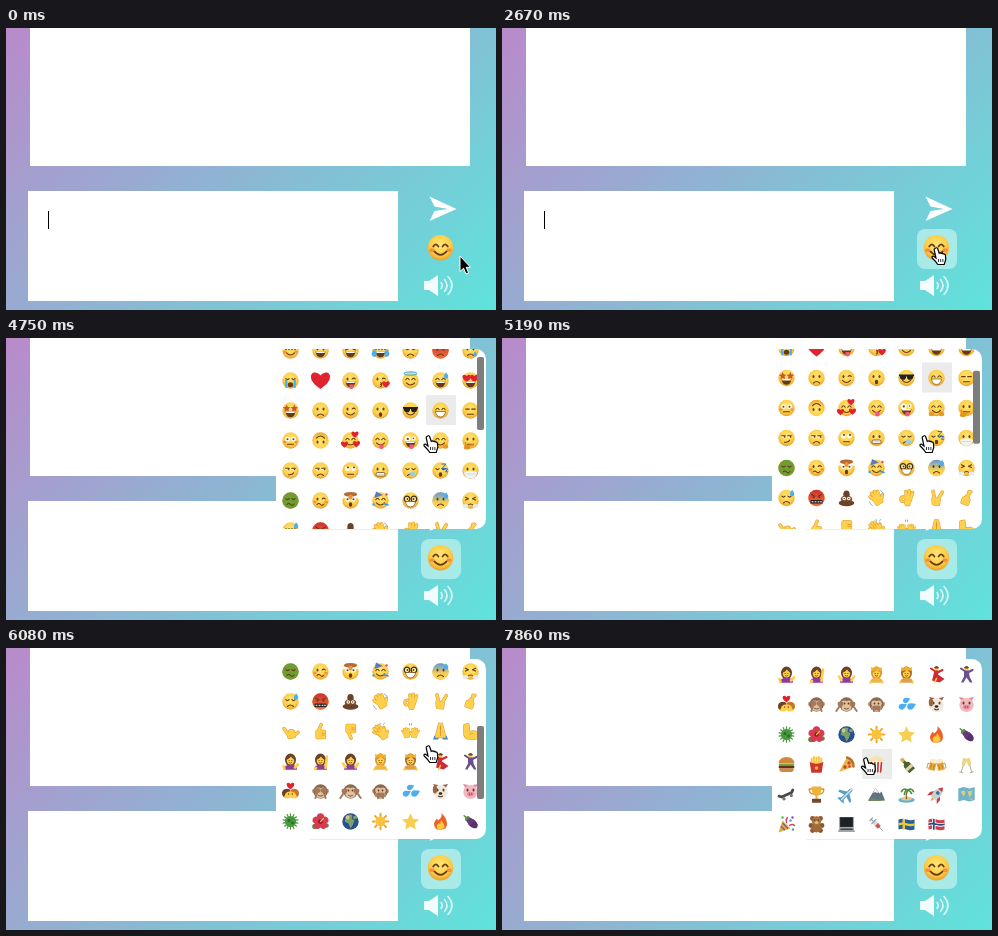
Recreate the animation shown at these times as an HTML page. Size 490 px wide and 282 px high, loop 8000 ms.

```html
<!DOCTYPE html>
<html lang="en">
<head>
<meta charset="utf-8">
<title>Emoji picker</title>
<style>
html, body { margin: 0; height: 100%; overflow: hidden; }
svg { display: block; width: 100vw; height: 100vh; }
</style>
</head>
<body>
<svg viewBox="0 0 490 282">
  <defs>
    <linearGradient id="bg" gradientUnits="userSpaceOnUse" x1="0" y1="0" x2="386" y2="386">
      <stop stop-color="#b98aca"/><stop offset="1" stop-color="#5fe3dc"/>
    </linearGradient>
    <radialGradient id="face" cx=".5" cy=".38" r=".64">
      <stop stop-color="#ffe678"/><stop offset=".65" stop-color="#fccd45"/><stop offset="1" stop-color="#ea9a2a"/>
    </radialGradient>
    <linearGradient id="red" x2="0" y2="1"><stop stop-color="#cf3030"/><stop offset="1" stop-color="#f0703c"/></linearGradient>
    <linearGradient id="cold" x2="0" y2="1"><stop stop-color="#5a9be0"/><stop offset=".65" stop-color="#fcd050"/></linearGradient>
    <clipPath id="clip"><rect x="270" y="11" width="210" height="180" rx="10"/></clipPath>
  </defs>
  <rect width="490" height="282" fill="url(#bg)"/>
  <path d="M24 0H464V138H24zM22 163H392V273H22z" fill="#fff"/>
  <path id="caret" d="M42.5 183V201" stroke="#000"/>
  <path d="M423.5 168.5L450.5 181L423.5 193L428.5 183L442 181L428.5 178.500z" fill="#fff"/>
  <rect id="glow" x="415" y="201" width="40" height="40" rx="8" fill="#ecfff8" opacity=".47"/>
  <g id="button" transform="translate(434.5 219.8) scale(1.55)"></g>
  <path d="M418 253h5l9-6v21l-9-6h-5z" fill="#fff" opacity=".92"/>
  <path d="M435 254.5q2.4 3 0 6M438.5 251.5q5 6 0 12M442 248.500q8 9 0 18" fill="none" stroke="#fff" stroke-width="1.6" stroke-linecap="round" opacity=".75"/>
  <g id="picker">
    <rect x="270" y="11" width="210" height="180" rx="10" fill="#fff"/>
    <path d="M270 138V163H282V138z" fill="#fff"/>
    <path d="M304 191.5H392" stroke="#ededed"/>
    <g clip-path="url(#clip)">
      <g id="list"><rect id="hover" width="30" height="30" fill="#ebebeb"/><g id="grid"></g></g>
      <rect id="thumb" x="471" width="7" height="73" rx="2" fill="#7d7d7d"/>
    </g>
  </g>
  <path id="arrow" d="M0 0V15.5L3.6 12.2L6 18L8.6 17L6.2 11.3H10.5z" stroke="#fff"/>
  <g id="hand">
    <path d="M-.8 .2Q1-1 1.8 1L3.2 5.2Q4.4 4.3 5.2 5.4Q6.7 4.8 7.2 6Q9 5.7 9.400 7.2L9.8 11.5L8.2 16.5H1.8Q.2 13.7-3.8 10Q-4.7 8.2-2.6 8L0 10L-1.8 2Q-2 .8-.8 .2z" fill="#fff" stroke="#000" stroke-width="1.2"/>
    <path d="M2.5 11v3M4.7 11v3M6.9 11v3" stroke="#000" stroke-width=".8"/>
  </g>
</svg>
<script>
const $ = id => document.getElementById(id);
const INK = '#643b12', SKIN = '#ffcd48', WHITE = '#fff', BLUE = '#4aaef0', BROWN = '#6b4226', PURPLE = '#8f3aa0';

// Drawing helpers: every emoji lives in a box of about -8..8.
const P = (d, fill) => `<path d="${d}" fill="${fill}"/>`;
const L = (d, color = INK, w = 1.1) =>
  `<path d="${d}" fill="none" stroke="${color}" stroke-width="${w}" stroke-linecap="round" stroke-linejoin="round"/>`;
const E = (x, y, rx, ry, fill) => `<ellipse cx="${x}" cy="${y}" rx="${rx}" ry="${ry}" fill="${fill}"/>`;
const C = (x, y, r, fill) => E(x, y, r, r, fill);
const G = (transform, ...body) => `<g transform="${transform}">${body.join('')}</g>`;
const pair = draw => draw(-3) + draw(3);
const heart = (x, y, s, fill = '#e0242f') =>
  G(`translate(${x} ${y}) scale(${s})`, P('M0 7.5C-15-2-7-12 0-4.5C7-12 15-2 0 7.5z', fill));
const star = (x, y, r, fill) => {
  const pts = [...Array(10)].map((_, i) => {
    const a = (i / 5 - .5) * Math.PI, q = i % 2 ? r * .48 : r;
    return `${(x + q * Math.cos(a)).toFixed(2)} ${(y + q * Math.sin(a)).toFixed(2)}`;
  });
  return P(`M${pts.join('L')}z`, fill);
};
const spokes = (n, a, b, color, w) => [...Array(n)].map((_, i) =>
  G(`rotate(${i * 360 / n})`, L(`M0 ${a}V${b}`, color, w))).join('');
const drop = (x, y, s = 1) => G(`translate(${x} ${y}) scale(${s})`, P('M0-3Q4 2 0 3Q-4 2 0-3z', BLUE));
const ball = fill => C(0, 0, 8.2, fill);

const parts = {
  // skins
  red: ball('url(#red)'), green: ball('#6f9c35'), cold: ball('url(#cold)'),
  // eyes
  dot: pair(x => E(x, -1.6, 1, 1.5, INK)),
  arc: pair(x => L(`M${x - 1.7}-.8q1.7-2.8 3.4 0`)),
  down: pair(x => L(`M${x - 1.6}-1.8q1.6 1.8 3.2 0`)),
  line: pair(x => L(`M${x - 1.8}-1.4h3.6`)),
  squint: L('M-5-3.2l3 1.5-3 1.3M5-3.2l-3 1.5 3 1.3'),
  wink: E(-3, -1.6, 1, 1.5, INK) + L('M1.6-1.5q1.6-1.8 3.2 0'),
  wide: pair(x => C(x, -1.3, 2.4, WHITE) + C(x, -1.3, 1, INK)),
  roll: pair(x => C(x, -1.8, 2.3, WHITE) + C(x + .5, -3, 1, INK)),
  side: pair(x => E(x, -1.3, 2, 1.3, WHITE) + C(x + 1, -1.2, .9, INK) + L(`M${x - 1.8}-2.3h3.6`)),
  zany: C(-3, -1.6, 2.9, WHITE) + C(-2.7, -1.6, 1.1, INK) + C(3.3, -2, 1.9, WHITE) + C(3, -2, .8, INK),
  angry: L('M-5-3.4l3.4 1.6M5-3.4l-3.4 1.6') + pair(x => C(x, -.8, 1, INK)),
  hearts: heart(-3.8, -2.2, .5) + heart(3.8, -2.2, .5),
  stars: star(-3.8, -2, 4, '#c9562c') + star(3.8, -2, 4, '#c9562c'),
  shades: P('M-7.6-3.4h15.2v1.2l-.8.6q-.4 3.4-3.4 3.4t-3-3.4h-.8q0 3.4-3 3.4t-3.4-3.4l-.8-.6z', '#222'),
  specs: pair(x => `<circle cx="${x * 1.15}" cy="-1.5" r="2.8" fill="#fff" fill-opacity=".35" stroke="#3a2c1c" stroke-width="1.2"/>` + C(x, -1.5, .9, INK)),
  // mouths
  smile: L('M-4 2.3q4 4.4 8 0'),
  grin: P('M-5 1h10q-.8 5.8-5 5.8t-5-5.8z', INK) + P('M-4.500 1.100h9l-.5 1.500h-8z', WHITE),
  beam: P('M-5 1h10q-.8 5.4-5 5.4t-5-5.400z', WHITE) + L('M-5 1h10q-.8 5.4-5 5.4t-5-5.400z', INK, .6),
  sad: L('M-3 5q3-3 6 0'),
  o: E(0, 4, 1.7, 2.2, INK),
  wail: E(0, 4.2, 2.8, 2.5, INK),
  flat: L('M-3 3.8h6'),
  smirk: L('M-2 4.2q4 .4 5.2-2'),
  wave: L('M-3.5 4q1.8-2 3.5 0t3.5-.5'),
  kiss: L('M0 2.2q2.5.8 0 1.8q2.5 1 0 2'),
  teeth: '<rect x="-4.5" y="2" width="9" height="3.6" rx="1.5" fill="#fff" stroke="#643b12" stroke-width=".7"/>' + L('M-4 3.8h8', '#999', .5),
  tongue: P('M-1 4h4q.6 4.5-2 4.5t-2-4.5z', '#ee5a7c'),
  // extras
  blush: pair(x => `<ellipse cx="${x * 1.85}" cy="1.5" rx="1.7" ry="1.2" fill="#f0683c" opacity=".6"/>`),
  tear: drop(4.6, 3.5, .9),
  joy: drop(-6.4, 2.5, 1.3) + drop(6.4, 2.5, 1.3),
  stream: L('M-4.3 0V6.5M4.3 0V6.500', BLUE, 2.2),
  sweat: drop(5.6, -5, 1.1),
  halo: '<ellipse cy="-7" rx="6" ry="1.7" fill="none" stroke="#4cb5ea" stroke-width="1.3"/>',
  love: heart(-6, 4, .42) + heart(6, 3.5, .42) + heart(4.5, -6, .42),
  blow: heart(5.5, 4, .45),
  hugs: E(-5, 6, 2.8, 2.2, '#e59a22') + E(5, 6, 2.8, 2.2, '#e59a22'),
  think: E(-3.5, 7, 3.2, 2, '#e09422') + L('M-4.5 6l-.5-3.500M-3 5.500l5-1', '#e09422', 1.900),
  bubble: C(2, 3.5, 2.5, '#8fd0f4'),
  zzz: L('M1.5-6.5h4l-4 4.5h4M5-1.5h2.2l-2.2 2.8h2.2', '#3d6fc0', 1),
  mask: P('M-6.5 1.5Q0-.5 6.5 1.5Q6 8 0 8T-6.5 1.500z', '#eef3f6') + L('M-8 0l2 1.5M8 0l-2 1.5M-4.5 3.5h9', '#c6d2d8', .7),
  steam: E(-5, 5.5, 3, 1.9, '#e6eaec') + E(5, 5.5, 3, 1.9, '#e6eaec'),
  censor: '<rect x="-6" y="2" width="12" height="3.6" rx=".6" fill="#222"/>' + L('M-4.5 3.8h1M-1.5 3.8h1M1.5 3.8h1M4 3.8h1', WHITE, 1),
  blast: P('M-8.2-2.5h16.4l-2-2.5h-12.4z', WHITE) + E(0, -6.2, 6.5, 2.4, '#b56a3a') + E(0, -3.6, 2.2, 2.5, '#e8963d'),
  party: P('M-6-2.5L-4.5-9L2.5-5.500z', '#5a78c8') + L('M3 3l4.5 1.5', '#3a9ad9', 1.5) + C(6, -6, 1.200, '#e34a5f') + C(-7, 4, 1.200, '#36a7d8')
};
const face = spec => ball('url(#face)') + spec.split(' ').map(w => parts[w]).join('');

// A hand is one outline drawn twice: dark edge, then skin.
const limb = (d, rot = 0) => G(`rotate(${rot}) scale(1.1)`, ...[['#dd9626', 3.2], ['#ffd04c', 2.3]].map(([color, w]) =>
  `<path d="${d}" fill="${color}" stroke="${color}" stroke-width="${w}" stroke-linecap="round" stroke-linejoin="round"/>`));
const palm = 'M-2.5 1h5v4h-5z';
const spread = palm + 'M-2.5 1l-2-4.800M-.8 1l-.8-7M1 1l.4-7M2.500 1l1.500-5.500M2.500 4l3.500-3.500';
const person = (hair, shirt, arms, extra = '') =>
  E(0, -1.5, 5.5, 6.5, hair) + P('M-6.5 8.2q0-5 6.5-5t6.5 5z', shirt) + L(arms, SKIN, 2.6) +
  E(0, -1.2, 3.7, 4.2, SKIN) + P('M-4.2-1.500Q-4-7.500 0-7T4.200-1.500Q2-3 .5-5Q-1-3-4.200-1.500z', hair) +
  C(-1.4, -1, .6, INK) + C(1.4, -1, .6, INK) + L('M-1.200 1.200q1.200 1 2.400 0', INK, .7) + extra;
const crown = P('M-5-3.5l-.6-4 2.800 1.200 2.800-2.500 2.800 2.500 2.800-1.200-.6 4q-5-1.500-10 0z', '#f0ae2c');
const dancer = (color, dress) => L('M-1-3L-5.5-6M1-2L6-4.5', color, 2.1) + C(0, -5.8, 2.3, SKIN) +
  P('M-2.5-7q2.5-3 5 0l-1 1h-3z', BROWN) + P(dress, color);
const monkey = (...paws) => C(-6.3, -.5, 2.3, '#c99a74') + C(6.3, -.5, 2.3, '#c99a74') + C(0, 0, 7.2, '#8d6850') +
  E(-2.2, -1, 3, 3, '#dfc0a0') + E(2.2, -1, 3, 3, '#dfc0a0') + E(0, 3, 5, 3.7, '#dfc0a0') +
  C(-2, -1, .9, INK) + C(2, -1, .9, INK) + L('M-2 4q2 1.5 4 0', INK, .8) +
  paws.map(([x, y]) => E(x, y, 2.9, 2.4, '#a3795a') + L(`M${x} ${y + 1}L${x * 1.7} 6.500`, '#a3795a', 2)).join('');
const snout = (skin, ears) => P('M-5-3l-2.5-4.5 5.5 1zM5-3l2.5-4.5-5.5 1z', ears) + E(0, .5, 7.2, 7, skin) + parts.dot;
const flag = (ground, cross) => P('M-8-5q4-1.5 8 0t8 0v10q-4 1.5-8 0t-8 0z', ground) + cross.map(([color, w]) =>
  `<path d="M-8-.2q4-1.3 8 0t8 0M-2.7-5.6v10.8" fill="none" stroke="${color}" stroke-width="${w}"/>`).join('');
const mug = L('M2 0h3v4.500h-3', '#d9a04a', 1) + P('M-3.3-3h6.6v9h-6.6z', '#e9a63a') + L('M-1.5 0v4M1.5 0v4', '#c07c22', .9) + E(0, -3.5, 3.9, 2.2, '#f7ead0');
const flute = P('M-2.2-8h4.4l-.6 7q-1.6 2-3.2 0z', '#eed48a') + L('M0-.5v6.500M-1.7 6.5h3.4', '#b5b09c', 1);
const lover = hair => C(0, 0, 4.6, SKIN) + P('M-4.800 1Q-6-5 0-5.200Q3.500-5 3.500-2.500Q-1-3-2 1L-3 3z', hair) + C(1.700, 0, .7, INK);

const icons = {
  heart: heart(0, 0, 1.12),
  flip: G('rotate(180)', face('dot smile')),
  poop: E(0, 5, 7.8, 3.2, BROWN) + E(0, 1, 5.8, 3.5, '#7a4e33') + E(0, -3.8, 3.2, 3.8, BROWN) + G('translate(0 1.500) scale(.75)', parts.wide, parts.smile),
  hi: limb(spread, -32) + L('M4-7.500q2.500 1 3 3.500M-7 4q.5 2.500 3 3.500', '#7fa4bd', .9),
  ok: L('M-3.5 3.500a2.400 2.400 0 1 1 2.500-3', '#dd9626', 3) + limb('M-1 3h3.500l-.5 3h-2zM.5 3L-.5-6M2 3L2.500-6.500M3 3L5.500-5') + L('M-3.5 3.500a2.400 2.400 0 1 1 2.500-3', SKIN, 2),
  peace: limb('M-3 1h5.500v4.500h-4.500zM-1.500 1l-2.500-6.500M1.500 1l3-7', 8),
  luck: limb(palm + 'M-1.5 1l3.5-7.500M1.5 1l-1-7', 18),
  call: limb(palm + 'M-2.5 3l-2.500-7M2.5 4l4-1.500M-.5 1v-1.500M1.500 1v-1.300', -14),
  up: limb('M-3 0h6.5v5.5h-6.5zM-2 0l2.5-6') + L('M1.5 1.7h2.5M1.5 3.5h2.5', '#d98f1c', .7),
  clap: G('translate(-1 0) scale(.9)', limb(spread, -48)) + G('translate(2 2) scale(.85)', limb(spread, -30)) + L('M0-7.500l-.5-1M3-7l1-1.500', BLUE, .8),
  praise: G('translate(-4.3 1.5) scale(.68)', limb(spread, -12)) + G('translate(4.3 1.5) scale(-.68 .68)', limb(spread, -12)) + L('M-1-6.5v-1.5M1-6.5v-1.5', BLUE, .9),
  pray: P('M-7.5 8l1.500-4 4 2v2zM7.5 8l-1.500-4-4 2v2z', '#3f87c9') + limb('M-.8-6.5L-3.500 4.500M.8-6.5L3.500 4.500M-1.500-1v5.500h3v-5.500z') + L('M0-6v10', '#d08a20', .7),
  flex: limb('M-2.500-6L-5-5.500L-5 1Q-5.500 6 0 6Q6 7 6 3.500Q5.500 0 2 .5Q0 .5-2 2.500L-2-3z') + L('M-1 3q1.500-2 3.500-1.500', '#d08a20', .7),
  tip: person(BROWN, PURPLE, 'M-6 7.500l-1-3M4.500 6l3-3'),
  raise: person(BROWN, PURPLE, 'M5 6.500L6.500-5M-5.500 7.500l1-1'),
  shrug: person(BROWN, PURPLE, 'M-5 6l-2.5-4M5 6l2.5-4'),
  prince: person('#d9982e', '#f0b544', 'M-6 8h0M6 8h0', crown),
  queen: person('#a86a2c', '#e0a045', 'M-6 8h0M6 8h0', crown),
  dance: dancer('#cf2a35', 'M-2-4h4l-.5 4 6.5 4.500-5 3.500-7.500-2z') + L('M0 4l-2 4', SKIN, 1.5),
  disco: dancer('#6b5090', 'M-2.5-4h5l.5 6 3 6h-2.5l-3.5-5-3 5h-2.5l3-6z'),
  couple: G('translate(-3.500 2.500)', lover(BROWN)) + G('translate(3.500 2.500) scale(-1 1)', lover('#c8742c')) + heart(0, -5.500, .45),
  see: monkey([-3, -1], [3, -1]), hear: monkey([-6, -.5], [6, -.5]), speak: monkey([-1.5, 3.500], [1.5, 3.500]),
  splash: G('rotate(65)', drop(0, 4, 1.5), drop(-4, -2, 1.300), drop(3.5, -4, 1.6)),
  dog: snout('#efe8de', '#9d6640') + E(-5.5, -2, 2.200, 4, '#9d6640') + E(0, 2, 1.8, 1.3, '#222') + L('M-2 4.5q2 1.5 4 0'),
  pig: snout('#f3b7c0', '#e0909f') + E(0, 2.5, 3.4, 2.3, '#e2899b') + C(-1.1, 2.5, .7, '#93475a') + C(1.1, 2.5, .7, '#93475a'),
  germ: spokes(14, -5, -7.6, '#4c9440', 1.2) + C(0, 0, 5.6, '#459a3c') + C(-1.5, -1, 1.5, '#2b6b27') + C(2, 1.5, 1.4, '#2b6b27'),
  flower: C(-5.5, 5, 2.800, '#4f8f3c') + C(6, 4, 2.300, '#4f8f3c') + [0, 72, 144, 216, 288].map(a => G(`rotate(${a})`, E(0, -4.5, 3.6, 3.7, '#d83a50'))).join('') + C(0, 0, 2.2, '#8f1730') + L('M0 0l3-3', '#f7c83c', 1.2),
  globe: C(0, 0, 8.2, '#264f94') + P('M-4-6q4-2 6 0l-1 3 3 2-2 5-2 3-2-5-4-2z', '#7da065') + E(4.500, -4, 2, 1.700, '#7da065') + C(-3, -4, 2, '#d6c48c'),
  sun: spokes(8, -5.5, -7.7, '#f2a52c', 2) + C(0, 0, 5, '#f9c43c'),
  star: star(0, .7, 9, '#f7cd52'),
  fire: P('M1-8.5Q6.500-3 6.500 2.500T0 8.3T-6.5 2Q-5.500-1-3.5-3L-2.5-1Q2-4 1-8.500z', '#ee5f2a') + P('M.5-1.500Q4 3 4 5T0 8T-3.8 4Q-2.500 2-1.5 1L-.5 3z', '#fccb3a'),
  plant: G('rotate(-48)', E(0, 3, 3.8, 5.800, '#57306c'), P('M-2-5.500h4l1.800 8h-7.600z', '#66387c'), P('M-3-4.500q3-4 6 0l-1.500 1.500-1.500-1-1.500 1z', '#5c8f45'), L('M0-6v-2.500', '#5c8f45', 1.5)),
  burger: P('M-7.8-1Q-7.5-7.5 0-7.5T7.8-1z', '#d0893c') + L('M-7 .2h14', '#7aa643', 1.7) + L('M-6.5 2.5h13', '#643319', 2.8) + P('M-7.3 4h14.6q0 3.5-3 3.5h-8.6q-3 0-3-3.500z', '#d0893c'),
  fries: L('M-4.8-1v-5M-2.4-1v-6.5M0-1v-6M2.400-1v-6.500M4.8-1v-5', '#f5c54c', 2) + P('M-6.8-2.5q6.8 3.5 13.6 0l-1.6 10.7h-10.4z', '#d0342f') + C(0, 3.5, 1.8, '#f2b932'),
  pizza: P('M-7.5 7.500L.5-7.5Q7-5 7.500 2z', '#f0b748') + L('M.5-7Q7-5 7 2', '#b5702f', 2.4) + C(2.5, -1.500, 1.7, '#c4452c') + C(-1.500, 2.5, 1.7, '#c4452c') + C(3, 2, 1.200, '#c4452c'),
  popcorn: [-4.5, -1.5, 1.5, 4.5].map(x => C(x, -4.2 - (x * x < 4) * 1.8, 2.6, '#f5e3ad')).join('') + P('M-6.5-3h13l-1.300 11.2h-10.4z', WHITE) + L('M-5-2l.9 9.3M-1.6-2l.3 9.3M1.6-2l-.3 9.3M5-2l-.9 9.300', '#c9352f', 1.7),
  bottle: G('rotate(-42)', P('M-1.5-7h3v5q2.300 1 2.300 3v7.500h-7.600v-7.500q0-2 2.300-3z', '#4b6330'), P('M-1.7-8h3.400v4h-3.4z', '#d3ae58'), P('M-3.8 2.500h7.6v3.200h-7.6z', '#e6d6a4')),
  beers: G('translate(-3.600 0) rotate(14) scale(-1 1)', mug) + G('translate(3.600 0) rotate(-14)', mug),
  toast: G('translate(-3.500 1.5) rotate(16)', flute) + G('translate(3.500 1.5) rotate(-16)', flute),
  board: G('rotate(-24)', L('M-7.5-1.500l2 1.800h11l2-1.800', '#47474c', 2.800), C(-4, 3, 1.6, '#7b6f64'), C(4, 3, 1.6, '#7b6f64')),
  trophy: L('M-4-5.5h-3.300q0 5 4.300 5M4-5.5h3.300q0 5-4.300 5', '#d3952a', 1.4) + P('M-5-8h10q0 8.5-4 9.5v3h-2v-3q-4-1-4-9.500z', '#eeb13a') + P('M-4.5 4.3h9v4h-9z', '#74492a'),
  plane: G('rotate(45)', P('M-1.7-6q1.7-4.500 3.4 0v3.500l6.5 4v2.2l-6.5-2v4l2.200 2v1h-7.800v-1l2.200-2v-4l-6.500 2v-2.2l6.5-4z', '#5b9dc4'), L('M0-7v14', '#d6e6ee', 1.500)),
  peak: P('M-8.5 6L-1-6.5L3-1L5-3L8.5 6z', '#5f7482') + P('M-1-6.5l3 4.5-2 .5-1-1-2.5 1z', '#f2f6f8') + P('M-8.5 6.500l4-3 5 1.500 8 1.500z', '#6e8c52'),
  island: E(0, 5.5, 8.2, 2.7, '#62b5d2') + E(0, 4, 5.5, 2, '#e6c987') + L('M0 4Q-1 0 1-4', '#8b5a2c', 1.4) + L('M1-4q-4-3-6 1M1-4q4-3 6 1M1-4q-3 0-3 4M1-4q3 0 4 3', '#4d933f', 1.7),
  rocket: G('rotate(42)', P('M-3 3l-3.500 4v-5l3.500-4zM3 3l3.500 4v-5l-3.500-4z', '#cc3d38'), P('M0-9.500Q6.500-3 2.7 5h-5.4Q-6.5-3 0-9.500z', '#c5d0d8'), P('M0-9.5l2.800 4h-5.600z', '#cc3d38'), C(0, -2, 1.8, '#3f6f98'), P('M-1.5 5h3l-1.5 4z', '#f5a32a')),
  map: P('M-8.2-6l5.200-1.5 6 1.5 5.200-1.5v13l-5.2 1.5-6-1.5-5.200 1.500z', '#6fb4c8') + P('M-6-3l4-1 1 3-2 3zM1-3l5-1-1 4-2 3zM3 4h3v1h-3z', '#d3cd8c'),
  popper: P('M-8 8l4-12 8 8z', '#dfab3c') + L('M-5.300 2l3.300 3.300M-3.500-1l4.500 4.500', '#7a5aa8', 1.3) + L('M0-2q-1-3 1-5M3 1q3-2 5 0', '#d0405c', 1.300) + [[4, -4], [-4, -7], [6, -7], [6.500, 5]].map(([x, y], i) => C(x, y, 1.2, ['#3fa0da', '#59b14b', '#8a4cc0'][i % 3])).join(''),
  bear: [[-4, -6], [4, -6], [-5.500, 1], [5.500, 1], [-4, 6], [4, 6]].map(([x, y]) => C(x, y, 2.400, '#8a572f')).join('') + E(0, 3, 4.800, 5, '#a06a3a') + C(0, -3.500, 4.700, '#a8723f') + E(0, -2, 2, 1.500, '#dfb884') + C(-1.800, -4.500, .7, INK) + C(1.800, -4.500, .7, INK),
  laptop: P('M-7-7.5h14v10.5h-14z', '#4a4d50') + P('M-6.200-6.700h12.4v9h-12.4z', '#1d2024') + P('M-7 3h14l1.500 4.500h-17z', '#a0a3a6') + L('M-5.500 4.7h11', '#444', 1.600),
  needle: G('rotate(-45)', P('M-2-4h4v8h-4z', '#d0dae0'), P('M-2 0h4v4h-4z', '#cc5a50'), L('M0 4v5', '#8d989e', .8), L('M0-4v-3M-2-7.5h4M-3-4h6', '#8a949c', 1)),
  sweden: flag('#2a5f95', [['#f0c93c', 2.4]]),
  norway: flag('#cc4048', [[WHITE, 3.4], ['#2c4680', 1.7]])
};
icons.down = G('rotate(180) scale(-1 1)', icons.up);

const rows = [
  'arc smile blush,dot grin,squint grin,arc grin joy,down sad,red angry sad,dot sad tear',
  'down wail stream,heart,wink grin tongue,wink kiss blow,arc smile halo,arc grin sweat,hearts grin',
  'stars grin,dot sad,wink smile,dot o,shades smile,arc beam,line flat',
  'wide flat blush,flip,arc smile love,arc smile tongue,zany grin tongue,arc smile hugs,dot flat think',
  'side smirk,side sad,roll flat,dot teeth,down sad bubble,down o zzz,dot mask',
  'green down wave,wink wave blush,wide o blast,arc smile party,specs beam,cold dot sad sweat,squint sad steam',
  'down sad sweat,red angry censor,poop,hi,ok,peace,luck',
  'call,up,down,clap,praise,pray,flex',
  'tip,raise,shrug,prince,queen,dance,disco',
  'couple,see,hear,speak,splash,dog,pig',
  'germ,flower,globe,sun,star,fire,plant',
  'burger,fries,pizza,popcorn,bottle,beers,toast',
  'board,trophy,plane,peak,island,rocket,map',
  'popper,bear,laptop,needle,sweden,norway'
];
const CELL = 30, LEFT = 270, TOP = 11, BOTTOM = 191;
$('grid').innerHTML = rows.map((row, r) => row.split(',').map((name, c) =>
  G(`translate(${LEFT + 14.5 + c * CELL} ${TOP + 15.5 + r * CELL})`, icons[name] || face(name))).join('')).join('');
$('button').innerHTML = face('arc smile blush');

// Keyframes are [tick, ...values]; everything moves in even ticks.
const LOOP = 8000, TICK = 148.3, OPEN = 20, SETTLED = 47;
const pointer = [[12, 454, 228], [16, 434, 220], [24, 434, 220], [25, 434, 215], [29, 422, 98], [50, 422, 98], [53, 363.5, 110]];
const scrolling = [[30, 0], [31, 4], [32, 14], [33, 14], [37, 79], [38, 79], [41, 153], [43, 213], [44, 232], [45, 232], [46, 238], [SETTLED, 240]];
const blinks = [2, 5, 8, 12, 15, 18, OPEN];

function at(keys, k) {
  const i = keys.findIndex(key => key[0] > k);
  if (i < 0) return keys[keys.length - 1].slice(1);
  if (!i) return keys[0].slice(1);
  const a = keys[i - 1], b = keys[i], p = (k - a[0]) / (b[0] - a[0]);
  return a.slice(1).map((v, j) => v + (b[j + 1] - v) * p);
}
const show = (id, on) => { $(id).style.display = on ? '' : 'none'; };
const move = (id, x, y) => $(id).setAttribute('transform', `translate(${x} ${y})`);

function draw(time) {
  const k = Math.floor((time % LOOP + 6) / TICK);
  const [x, y] = at(pointer, k), [scroll] = at(scrolling, k);
  const open = k >= OPEN, overButton = k >= 14;

  // The blink list toggles an initially visible caret; it ends hidden.
  show('caret', !open && blinks.filter(b => b <= k).length % 2 === 0);
  show('glow', overButton);
  show('arrow', !overButton);
  show('hand', overButton);
  move('arrow', x, y);
  move('hand', x, y);

  show('picker', open);
  move('list', 0, -scroll);
  // The hovered cell is only refreshed once scrolling has settled.
  const row = Math.floor((y - TOP + (k < SETTLED ? 0 : scroll)) / CELL), col = Math.floor((x - LEFT) / CELL);
  show('hover', y < BOTTOM);
  $('hover').setAttribute('x', LEFT + col * CELL);
  $('hover').setAttribute('y', TOP + row * CELL);
  $('thumb').setAttribute('y', 13 + scroll * .425);
  $('thumb').setAttribute('opacity', k < 31 ? 0 : Math.min(1, Math.max(0, (53 - k) / 3)));
}

const start = performance.now();
function loop() {
  draw(performance.now() - start);
  requestAnimationFrame(loop);
}
loop();
</script>
</body>
</html>
```
